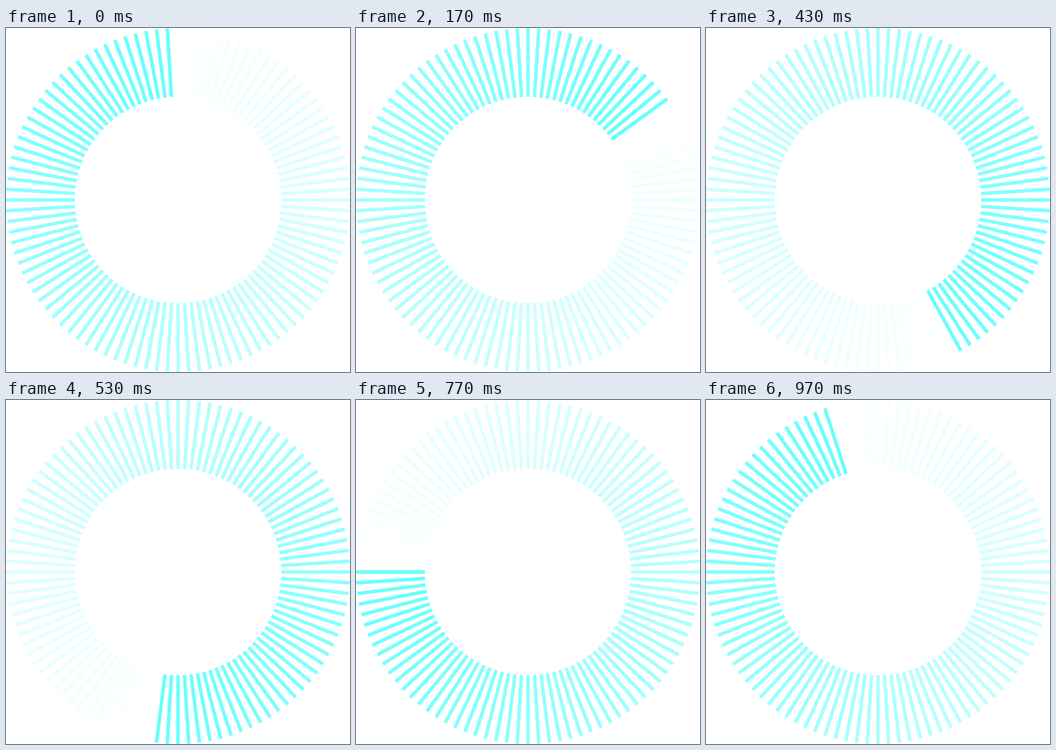
Recreate the animation shown at these times as an HTML page with a canvas. Size 748 by 748 pixels, loop 1000 ms.

```html
<!DOCTYPE html>
<html lang="en">
<head>
<meta charset="utf-8">
<title>Spinner</title>
<style>
  html, body { margin: 0; height: 100%; overflow: hidden; background: #fff; }
  canvas { display: block; }
</style>
</head>
<body>
<canvas width="748" height="748"></canvas>
<script>
const ctx = document.querySelector("canvas").getContext("2d");
const SIZE = 748, SPOKES = 100, LOOP = 1000, FPS = 30;
const unit = SIZE / 50; // outer radius is 25 units

function draw(phase) {
  ctx.setTransform(1, 0, 0, 1, 0, 0);
  ctx.clearRect(0, 0, SIZE, SIZE);
  ctx.translate(SIZE / 2, SIZE / 2);
  ctx.scale(unit, unit);
  ctx.fillStyle = "#6ff";
  for (let i = 0; i < SPOKES; i++) {
    // each spoke flashes in turn, then fades linearly over one loop
    const age = (phase + 1 - (i + 1) / SPOKES) % 1;
    ctx.globalAlpha = 1 - age;
    ctx.fillRect(-0.25, -25, 0.5, 10);
    ctx.rotate(2 * Math.PI / SPOKES);
  }
}

// 30 steps per loop, each starting on a whole 10 ms
function stepAt(ms) {
  const tick = Math.floor(ms / 10) * 10;
  return Math.floor((tick + 4) * FPS / 1000);
}

const start = performance.now();
function loop() {
  draw(stepAt((performance.now() - start) % LOOP) / FPS);
  requestAnimationFrame(loop);
}
loop();
</script>
</body>
</html>
```
